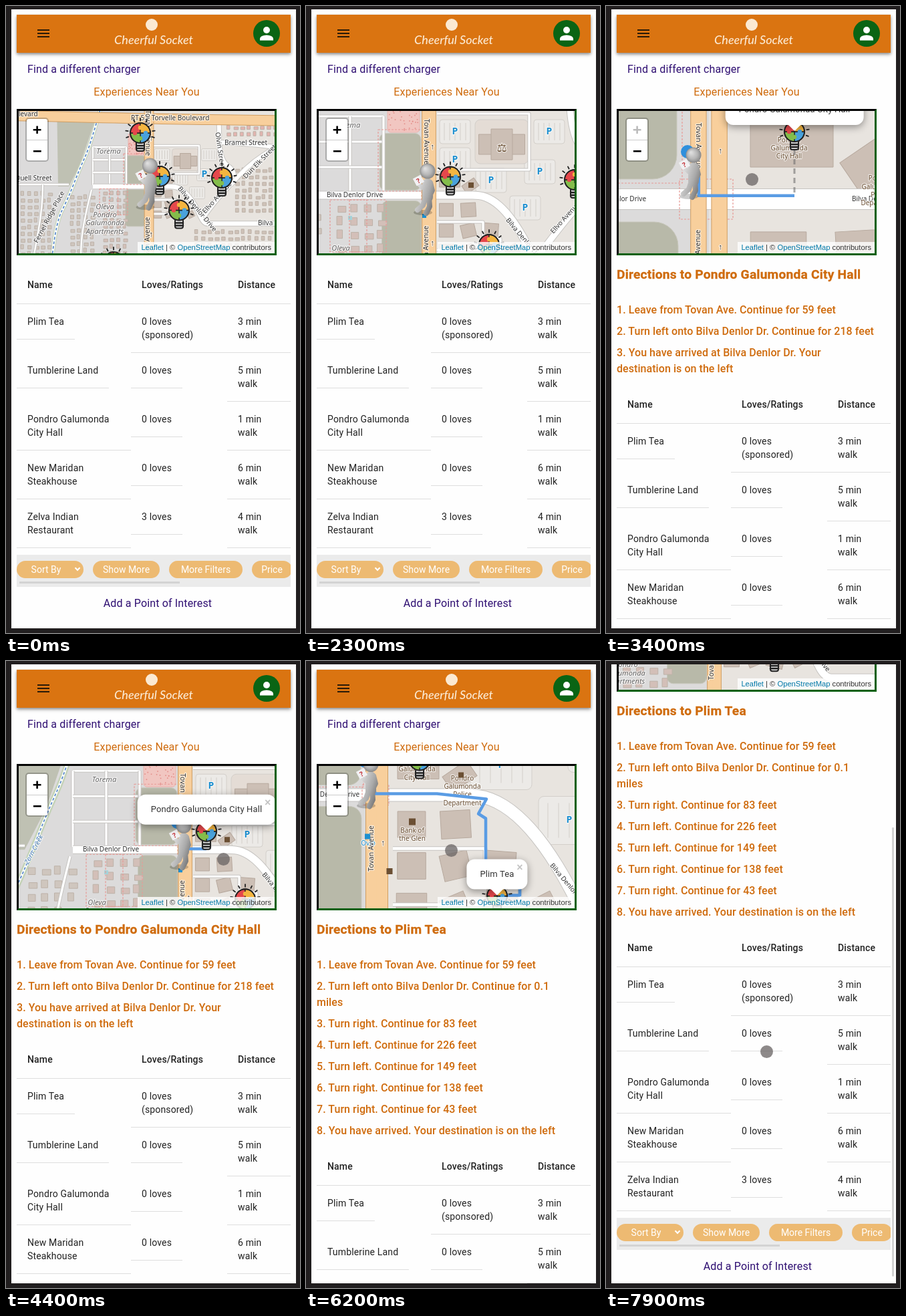
An HTML page with a canvas for the animation above (8 s loop, 440 by 938 pixels).

```html
<!DOCTYPE html>
<html lang="en">
<head>
<meta charset="utf-8">
<title>Nearby experiences</title>
<style>
html,body{margin:0;width:100%;height:100%;overflow:hidden;background:#211e1f}
#stage{position:absolute;left:0;top:0;width:440px;height:938px;overflow:hidden;font:16px/24px Roboto,sans-serif}
#page{position:absolute;left:8px;top:5px;width:426px;height:926px;overflow:hidden;background:#fefefe}
#scroll{position:absolute;left:-8px;top:-5px;width:440px;height:1280px}
#scroll div,#scroll span,#scroll canvas{position:absolute;box-sizing:border-box}
span{white-space:pre;letter-spacing:.15px}
.title{letter-spacing:.2px;-webkit-text-stroke:.3px}
.step{letter-spacing:.05px}
#bar{left:16px;top:13px;width:410px;height:57px;background:#da7411;box-shadow:0 2px 4px rgba(0,0,0,.35),0 3px 6px rgba(0,0,0,.16)}
#map{left:16px;top:154px;width:389px;height:219px;border:3px solid;border-color:#050505 #07600f #07600f #050505;overflow:hidden}
#zoom{left:10px;top:10px;width:35px;height:66px;border:2px solid rgba(0,0,0,.22);border-radius:5px;background:#fff;background-clip:padding-box;font:bold 22px/31px "DejaVu Sans Mono",monospace;text-align:center}
#zoom div{left:0;width:31px;height:31px}
#minus{top:31px;border-top:1px solid #ccc}
#credit{right:0;bottom:0;height:17px;padding:0 5px;background:rgba(255,255,255,.8);font:11.2px/17px "Liberation Sans",Arial,sans-serif;color:#333;white-space:pre}
#credit b{font-weight:400;color:#0078a8}
#pop{height:45px;padding:0 20px;border-radius:12px;background:#fff;box-shadow:0 3px 12px rgba(0,0,0,.4);font:13px/44px Roboto,sans-serif;color:#333;white-space:pre}
#pop i{position:absolute;left:50%;top:36px;width:15px;height:15px;margin-left:-7.5px;background:#fff;transform:rotate(45deg)}
#scroll #pop span{position:static}
#pop b{position:absolute;right:7px;top:2px;font:bold 16px/20px "Liberation Sans",sans-serif;color:#c3c3c3}
#strip{left:16px;top:821px;width:410px;height:48px;background:#ebebeb;overflow:hidden}
#strip div{top:9px;height:26px;border-radius:13px;background:#edba72;color:#fff;font-size:14px;line-height:26px;text-align:center}
#strip .sort{padding-right:12px}
#strip i{position:absolute;right:6px;top:8px;width:4px;height:4px;border:solid #fff;border-width:0 2px 2px 0;transform:rotate(45deg)}
#strip b{position:absolute;left:4px;top:40px;width:240px;height:3px;background:#d3d3d3}
#thumb,#dot{position:absolute}
#thumb{left:428px;top:0;width:3px;height:672px;border-radius:2px;background:#d2d2d2}
#dot{left:-9.5px;top:-9.5px;width:19px;height:19px;border-radius:50%;background:rgba(105,100,100,.76)}
</style>
</head>
<body>
<div id="stage">
 <div id="page"><div id="scroll">
  <div id="bar"></div>
  <canvas id="head" width="440" height="80"></canvas>
  <div id="map">
   <canvas id="view" width="383" height="213"></canvas>
   <div id="pop"><span></span><i></i><b>×</b></div>
   <div id="zoom"><div id="plus">+</div><div id="minus">−</div></div>
   <div id="credit"><b>Leaflet</b> | © <b>OpenStreetMap</b> contributors</div>
  </div>
  <div id="steps"></div>
  <div id="table"><div id="strip"><b></b></div></div>
 </div></div>
 <div id="thumb"></div><div id="dot"></div>
</div>
<script>
const $ = id => document.getElementById(id);
const ORANGE = '#cf6b0d', INDIGO = '#2f0f72', INK = '#222', BROWN = '#6b4f33', BLUE = '#1c8fd0', GREY = '#666';
const HALL = 'Pondro Galumonda City Hall', TEA = 'Plim Tea', DRIVE = 'Bilva Denlor Drive', AVENUE = 'Tovan Avenue';

// ---- page ----
function text(box, x, y, str, size, color, weight = 400, cls = '') {
  const e = document.createElement('span');
  e.textContent = str;
  e.className = cls;
  e.style.cssText = `left:${x}px;top:${y - 12}px;font-size:${size}px;color:${color};font-weight:${weight}`;
  box.append(e);
  return e;
}
const middle = e => { e.style.transform = 'translateX(-50%)'; };
const table = $('table');
function rule(x, y, w) {
  const e = document.createElement('div');
  e.style.cssText = `left:${x}px;top:${y}px;width:${w}px;height:1px;background:#dedede`;
  table.append(e);
}

text($('scroll'), 32, 95, 'Find a different charger', 16, INDIGO);
middle(text($('scroll'), 210.5, 129, 'Experiences Near You', 16, ORANGE));

const COLS = [16, 187, 331, 426];
['Name', 'Loves/Ratings', 'Distance'].forEach((s, i) => text(table, COLS[i] + 16, 417, s, 14, INK, 500));
rule(16, 445, 410);
[
  [TEA, '0 loves\n(sponsored)', '3 min\nwalk'],
  ['Tumblerine Land', '0 loves', '5 min\nwalk'],
  ['Pondro Galumonda\nCity Hall', '0 loves', '1 min\nwalk'],
  ['New Maridan\nSteakhouse', '0 loves', '6 min\nwalk'],
  ['Zelva Indian\nRestaurant', '3 loves', '4 min\nwalk']
].forEach((row, r) => row.forEach((cell, c) => {
  const top = 446 + r * 73, lines = cell.split('\n'), x = COLS[c];
  const spans = lines.map((s, k) => text(table, x + 16, top + 26 + k * 20, s, 14, INK));
  rule(x, top + 32 + 20 * lines.length, lines[1] ? COLS[c + 1] - x : spans[0].offsetWidth + 32);
}));

let left = 0;
[['Sort By', 100], ['Show More', 100], ['More Filters', 110], ['Price', 60]].forEach(([s, w], i) => {
  const b = document.createElement('div');
  b.style.left = left + 'px'; b.style.width = w + 'px';
  b.textContent = s;
  if (!i) { b.className = 'sort'; b.append(document.createElement('i')); }
  $('strip').append(b);
  left += w + 14;
});
middle(text(table, 227, 894, 'Add a Point of Interest', 16, INDIGO));

const PLANS = [null, {
  title: HALL,
  lines: ['1. Leave from Tovan Ave. Continue for 59 feet', '2. Turn left onto Bilva Denlor Dr. Continue for 218 feet',
    '3. You have arrived at Bilva Denlor Dr. Your\ndestination is on the left']
}, {
  title: TEA,
  lines: ['1. Leave from Tovan Ave. Continue for 59 feet', '2. Turn left onto Bilva Denlor Dr. Continue for 0.1\nmiles',
    '3. Turn right. Continue for 83 feet', '4. Turn left. Continue for 226 feet', '5. Turn left. Continue for 149 feet',
    '6. Turn right. Continue for 138 feet', '7. Turn right. Continue for 43 feet', '8. You have arrived. Your destination is on the left']
}];
let shown = 0;
function showPlan(n) {
  if (n === shown) return;
  shown = n;
  const box = $('steps'), plan = PLANS[n];
  box.textContent = '';
  table.style.top = 0;
  if (!plan) return;
  text(box, 16, 402, 'Directions to ' + plan.title, 19.2, ORANGE, 700, 'title');
  let y = 455;
  for (const s of plan.lines) {
    text(box, 16, y, s, 16, ORANGE, 500, 'step');
    y += 8 + 24 * s.split('\n').length;
  }
  table.style.top = y - 396 + 'px';
}

// ---- header ----
const h = $('head').getContext('2d');
function disc(c, x, y, r, fill) { c.fillStyle = fill; c.beginPath(); c.arc(x, y, r, 0, 7); c.fill(); }
h.fillStyle = '#2a1a08';
for (let y = 35; y < 50; y += 5) h.fillRect(47, y, 18, 2);
disc(h, 218, 28, 9, '#fbe9d2');
h.font = 'italic 500 18px Lato,sans-serif';
h.textAlign = 'center';
h.fillText('Cheerful Socket', 221, 57);
disc(h, 390, 41, 20, '#0a6414');
disc(h, 390, 36, 5, '#fff');
h.beginPath(); h.ellipse(390, 49, 10, 5.5, 0, Math.PI, 0); h.rect(380, 48.5, 20, 3); h.fill();

// ---- map: world units are pixels at scale 1, origin at the main crossing ----
const g = $('view').getContext('2d');
let S, CX, CY;
const X = x => CX + x * S, Y = y => CY + y * S;
function path(p) {
  g.beginPath();
  for (let i = 0; i < p.length; i += 2) g.lineTo(X(p[i]), Y(p[i + 1]));
}
function curve(p) {
  const n = p.length;
  g.beginPath(); g.moveTo(X(p[0]), Y(p[1]));
  for (let i = 2; i < n - 2; i += 2)
    g.quadraticCurveTo(X(p[i]), Y(p[i + 1]), X((p[i] + p[i + 2]) / 2), Y((p[i + 1] + p[i + 3]) / 2));
  g.lineTo(X(p[n - 2]), Y(p[n - 1]));
}
function line(color, w, dash = []) {
  g.strokeStyle = color; g.lineWidth = w; g.setLineDash(dash); g.stroke(); g.setLineDash([]);
}
function road(p, w, fill = '#fff', edge = '#c6c4c1') { curve(p); line(edge, w + 2); line(fill, w); }
// box around a centre
function box(x, y, w, hh, fill, edge, r = 0, turn = 0) {
  g.save(); g.translate(X(x), Y(y)); g.rotate(turn);
  g.beginPath(); g.roundRect(-w * S / 2, -hh * S / 2, w * S, hh * S, r * S);
  g.fillStyle = fill; g.fill();
  if (edge) line(edge, 1);
  g.restore();
}
const noise = n => { const v = Math.sin(n * 127.1) * 43758.5; return v - Math.floor(v); };
const square = (x, y, r, c) => { g.fillStyle = c; g.fillRect(X(x) - r, Y(y) - r, 2 * r, 2 * r); };
const building = (x, y, w, hh, turn) => box(x, y, w, hh, '#ccbfb5', '#b7a99e', 0, turn);
function houses(x0, y0, x1, y1, fill) {
  for (let x = x0; x < x1; x += 20) for (let y = y0; y < y1; y += 20) {
    const n = noise(x * 1.7 + y * .31);
    box(x + n * 5, y + n * 4, 8 + n * 5, 13 - n * 5, fill, '#bdb2a8');
  }
}

// the drive runs straight, then bends along a parabola until it levels out
const driveY = x => x < 70 ? 0 : Math.min(111, (x - 70) ** 2 / 80);
const MAIN = [];
for (let x = 0; x <= 390; x += 10) MAIN.push(x, driveY(x));
const CREEK = [-146, -230, -176, -122, -208, -52, -243, 38, -278, 106, -300, 300];
const LOTS = [[39, -95], [39, -53], [93, -22], [180, -95], [166, -35], [144, 19]];

function ground() {
  const field = '#b8b9a9', lot = '#eceae7', rim = '#d3cfca';
  g.fillStyle = '#dcdbdb'; g.fillRect(0, 0, 383, 213);
  box(450, 0, 900, 900, '#e8e4df');
  path([-275, -196, -162, -196, -208, -62, -240, 0, -272, 0]);
  g.fillStyle = '#bfc1b3'; g.fill();
  box(-43, -50, 62, 85, field, '#c9c8bd', 9);
  box(-41, 64, 59, 111, field, '#c9c8bd', 9);
  box(-38, -126, 48, 64, '#f1c6c1', '#e9b3ae', 5);
  for (let k = 0; k < 70; k++) square(-60 + noise(k) * 44, -155 + noise(k + 90) * 58, .8, '#e38d88');
  curve(CREEK); line('#c5d3b8', 9 * Math.sqrt(S)); line('#fff', 4); line('#4c80c4', 1.6, [4, 3]);

  houses(-380, 20, -295, 210, '#cfc6be');
  houses(-232, 30, -165, 210, '#cfc6be');
  houses(-134, 18, -66, 210, '#d3bfb8');
  houses(236, -178, 380, -138, '#e4b4af');
  houses(262, -50, 380, 80, '#cfc2b8');
  houses(140, 134, 380, 210, '#cfc2b8');
  square(-118, 34, 3 * S, '#a4d3da');

  for (const [x, y] of LOTS) {
    box(x, y, 46, 36, lot, rim, 4);
    for (let k = -16; k < 20; k += 8) { path([x + k, y - 13, x + k, y + 13]); line(rim, 1); }
  }
  box(109, -80, 80, 66, '#e4dcd5', rim, 8);
  building(109, -76, 69, 30); building(109, -76, 32, 46);
  building(31, -22, 31, 20); building(62, -14, 22, 14, -.6);
  // offices south of the drive
  for (let x = 26; x < 240; x += 33) for (let y = 22; y < 110; y += 31) {
    const n = noise(x + y * 2.3);
    if (y > driveY(x + 14) + 18) building(x, y, 18 + n * 8, 17 + n * 7, x < 30 ? 0 : n - .6);
  }

  const thin = 3.2 * Math.sqrt(S);
  for (let i = 0; i < 3; i++) {
    const x = -168 + i * 50, y = -118 + i * 38;
    road([-168, y, -68, y], thin); road([x, -118, x, -4], thin);
  }
  road([-390, -6, -240, -6], thin); road([-318, -6, -318, 60, -345, 210], thin);
  road([-172, 10, -200, 120, -205, 220], thin);
  path([12, 40, 81, 40, 81, 60, 107, 65, 107, 82, 12, 82]); line('#c6c4c1', thin + 2); line('#fff', thin);
  path([12, -38, 150, -38, 150, -122, 12, -122]); line('#c6c4c1', thin + 2); line('#fff', thin);
  const mid = 9 * Math.pow(S, .6), wide = 11 * Math.pow(S, .72);
  road([160, 96, 204, 36, 248, -8, 258, -46, 212, -80, 209, -205], mid);
  road([245, -5, 290, -60, 390, -125], mid); road([210, -132, 300, -128, 390, -116], mid);
  road([-168, 0, 0, 0], wide); road(MAIN, wide);

  // footways
  for (const [x, y, w, hh] of [[-106, 46, 84, 78], [-106, 46, 26, 78], [-43, -52, 66, 92], [-1, 0, 20, 15]]) {
    g.beginPath(); g.rect(X(x - w / 2), Y(y - hh / 2), w * S, hh * S); line('#e79a96', 1.2, [3, 2]);
  }

  const lane = 12 * Math.pow(S, .45), peach = '#f8cf9c', edge = '#cf9d62';
  road([-400, -212, -30, -203, 400, -197], 13 * Math.sqrt(S) + 5, peach, edge);
  for (const [c, w] of [[edge, lane + 2], [peach, lane]])
    for (const x of [-3.9, 3.9]) { path([x, -400, x, 400]); line(c, w); }
}

function label(str, x, y, deg = 0, color = '#333', size = 10, style = '') {
  const rows = str.split('\n');
  g.save(); g.translate(X(x), Y(y)); g.rotate(deg * Math.PI / 180);
  g.font = `${style} ${size}px "Noto Sans","Open Sans",sans-serif`;
  g.textAlign = 'center'; g.textBaseline = 'middle'; g.lineJoin = 'round';
  rows.forEach((s, i) => {
    const dy = (i - (rows.length - 1) / 2) * 12.3;
    g.strokeStyle = 'rgba(255,255,255,.65)'; g.lineWidth = 2.5; g.strokeText(s, 0, dy);
    g.fillStyle = color; g.fillText(s, 0, dy);
  });
  g.restore();
}

// lowest and highest zoom, then the label
const LABELS = [
  [-1, 0, 'Torema', -121, -104, 0, GREY, 11, 'italic'],
  [-1, 0, 'Oleva\nPondro\nGalumonda\nApartments', -132, 98, 0, GREY, 11, 'italic'],
  [-1, -1, 'Torvelle Boulevard', 94, -203], [-1, -1, 'RT 52', -28, -203], [-1, -1, 'Boulevard', -380, -216],
  [-1, -1, 'Quell Street', -346, -24], [-1, -1, 'Fernel Ridge Place', -298, 92, -62],
  [-1, -1, 'Olvin Street', 212, -108, 82], [-1, -1, 'Bramel Street', 290, -130], [-1, -1, 'Dun Elk Street', 332, -74, -46],
  [-1, 0, 'Ellvo Avenue', 204, 34, -48], [0, 0, 'Zorn Creek', -226, 0, -62, '#4f7fb5', 10, 'italic'],
  [-1, -1, DRIVE, 410, 111], [-1, 1, DRIVE, 144, 68, 50], [0, 0, DRIVE, -111, 0], [1, 2, DRIVE, -34, 0], [2, 2, DRIVE, 64, 0],
  [0, 0, '⚖', 109, -70, 0, BROWN, 17],
  [1, 2, 'Pondro\nGalumonda\nCity Hall', 30, -19, 0, BROWN], [1, 2, 'Pondro\nGalumonda\nPolice\nDepartment', 64, -3, 0, BROWN],
  [1, 1, 'Bank of\nthe Glen', 26.5, 30, 0, BROWN], [1, 1, 'Ovlo', -6.5, 36.5, 0, BLUE]
];
function names() {
  const z = Math.round(Math.log2(S));
  for (const [lo, hi, ...l] of LABELS) if (z >= lo && z <= hi) label(...l);
  for (let k = -2; k < 2; k++) {
    const side = k < 0 ? 1 : -1, y = (k + .5) * 160 / S;
    label(AVENUE, -4, y, 90 * side, '#333', 10.5);
    label('→', 4, y * .9, -90, '#333', 12);
  }
  for (const [x, y] of z < 0 ? [LOTS[4]] : LOTS) label('P', x, y, 0, BLUE, 14, 'bold');
  if (z === 0 || z === 1) {
    square(-7, 31, 3 + z, BLUE);
    square(63, -15, 4, BROWN);
  }
  if (z === 1) { square(26.5, 20, 5, BROWN); square(9.5, 57, 4.5, BROWN); }
}

function bulb(wx, wy) {
  g.save(); g.translate(X(wx), Y(wy) + 1);
  g.lineCap = 'round';
  for (let k = 0; k < 9; k++) {
    const a = Math.PI * (.9 + k * .15), c = Math.cos(a), s = Math.sin(a);
    g.beginPath(); g.moveTo(c * 18.5, s * 18.5 - 4); g.lineTo(c * 22, s * 22 - 4); line('#222', 1.8);
  }
  g.fillStyle = '#ddd'; g.beginPath(); g.roundRect(-6, 9, 12, 14, 3); g.fill(); line('#222', 2);
  for (const y of [15, 19]) { g.beginPath(); g.moveTo(-6, y); g.lineTo(6, y); line('#222', 2.4); }
  const tint = ['#4aa2dc', '#84bd4b', '#e5484c', '#f4b540'], q = Math.PI / 2;
  tint.forEach((c, i) => {
    g.beginPath(); g.moveTo(0, -4); g.arc(0, -4, 15, i * q, (i + 1) * q);
    g.closePath(); g.fillStyle = c; g.fill(); line('#222', 1.3);
  });
  tint.forEach((c, i) => disc(g, 8 * Math.cos(i * q), 8 * Math.sin(i * q) - 4, 3.2, c));
  g.beginPath(); g.arc(0, -4, 15, 0, 7); line('#222', 2);
  g.restore();
}

function walker() {
  g.save(); g.translate(X(-7) + 1, Y(-10) + 1);
  const skin = g.createLinearGradient(-10, 0, 16, 8);
  skin.addColorStop(0, '#d6d6d6'); skin.addColorStop(.6, '#aaa'); skin.addColorStop(1, '#7c7c7c');
  const limb = (w, ...p) => {
    g.beginPath(); p.forEach(([x, y]) => g.lineTo(x, y));
    g.lineCap = g.lineJoin = 'round'; line(skin, w);
  };
  g.fillStyle = 'rgba(0,0,0,.2)'; g.beginPath(); g.ellipse(-3, 35, 14, 4, 0, 0, 7); g.fill();
  limb(8, [6, 12], [7, 26], [2, 36]);
  limb(8, [1, 12], [-3, 24], [-11, 31]);
  limb(16, [4, -8], [4, 12]);
  limb(6, [2, -12], [-4, -2], [-10, -8]);
  g.save(); g.translate(-10, -13); g.rotate(-.5);
  g.fillStyle = '#f1f1f3'; g.fillRect(-6, -6, 13, 12);
  g.fillStyle = '#c32f36'; g.font = 'bold 10px "Open Sans",sans-serif'; g.textAlign = 'center'; g.fillText('?', 0, 4);
  g.restore();
  limb(6, [9, -10], [12, 2], [8, 10]);
  const ball = g.createRadialGradient(0, -31, 1, 4, -27, 12);
  ball.addColorStop(0, '#dedede'); ball.addColorStop(.6, '#b5b5b5'); ball.addColorStop(1, '#858585');
  disc(g, 4, -27, 11.5, ball);
  g.restore();
}

const ROUTES = [null, [-3.8, -9.5, -3.8, -1.3, 32, -1.3],
  [-4, -9, -1, -1, 45, -1, 82, 3, 76, 14, 81.5, 17.5, 81.5, 60, 107, 65, 107, 75, 92, 75]];
const PINS = [[-26, -154], [218, -20], [32, -24.5], [90, 77], [-106, 232]];

function drawMap(v, plan) {
  S = v[0]; CX = v[1] - 19; CY = v[2] - 157;
  g.lineCap = 'butt'; g.lineJoin = 'round';
  ground(); names();
  if (plan) {
    if (plan === 1) { path([32, -22, 32, -1.3]); line('rgba(110,110,110,.6)', 3, [8, 6]); }
    path(ROUTES[plan]); line('#5a9ce4', 4.5);
    disc(g, X(-7) - 4, Y(-10) - 31, 10, '#2f8fdc');
  }
  PINS.forEach(p => bulb(...p));
  walker();
}

// ---- timeline ----
const TAPS = { hall: 2800, tea: 5700 }, DRAG = [4600, 5200];
// start, factor, fixed point
const ZOOMS = [
  [1100, 2, 244, 257], [2950, 4, 194, 281], [3650, .5, 306, 280], [4000, .5, 306, 280], [5900, 2, 148, 212], [6400, .5, 218, 282]
];
// start, end, place reached
const GLIDES = [
  [2500, 2650, 218, 259], [3500, 3650, 306, 280], [4250, 4400, 325, 296], [...DRAG, 184, 220],
  [5200, 5500, 217, 283], [6600, 6800, 267, 560], [7200, 7900, 240, 584]
];
const clamp = u => Math.max(0, Math.min(1, u));
const part = (t, a, b) => clamp((t - a) / (b - a));
const smooth = u => u * u * (3 - 2 * u), out = (u, n) => 1 - (1 - u) ** n;

function dotAt(t) {
  let x = 230, y = 300;
  for (const [a, b, tx, ty] of GLIDES) {
    const u = smooth(part(t, a, b));
    x += (tx - x) * u; y += (ty - y) * u;
  }
  return [x, y];
}
function viewAt(t) {
  let s = .5, x = 214, y = 270;
  const from = dotAt(DRAG[0]), to = dotAt(Math.max(DRAG[0], Math.min(DRAG[1], t)));
  for (const [a, k, px, py] of ZOOMS) {
    if (a > DRAG[1] && t < a) break;
    const f = 1 + (k - 1) * out(part(t, a, a + 250), 3);
    const dx = a > DRAG[1] ? to[0] - from[0] : 0, dy = a > DRAG[1] ? to[1] - from[1] : 0;
    s *= f;
    x = px + (x + dx - px) * f - dx; y = py + (y + dy - py) * f - dy;
  }
  return [s, x + to[0] - from[0], y + to[1] - from[1]];
}
const scrollAt = t => 177 * part(t, 6800, 7200) + 150 * out(part(t, 7200, 7900), 2);

function frame() {
  const t = performance.now() % 8000;
  const plan = t < TAPS.hall + 150 ? 0 : t < TAPS.tea + 200 ? 1 : 2;
  const v = viewAt(t), y = scrollAt(t), tea = t >= TAPS.tea;
  showPlan(plan);
  drawMap(v, plan);

  const pop = $('pop'), [px, py] = PINS[tea ? 3 : 2];
  pop.style.visibility = t >= TAPS.hall ? 'visible' : 'hidden';
  pop.firstChild.textContent = tea ? TEA : HALL;
  pop.style.transform = `translate(${X(px)}px,${Y(py) - 58}px) translateX(-50%)`;
  $('plus').style.color = v[0] > 3.9 ? '#bbb' : '#000';

  $('scroll').style.transform = `translateY(${-y}px)`;
  $('thumb').style.opacity = t > 6750 ? 1 : 0;
  $('thumb').style.transform = `translateY(${6 + y * .742}px)`;
  const [dx, dy] = dotAt(t);
  $('dot').style.opacity = part(t, 2500, 2650);
  $('dot').style.transform = `translate(${dx}px,${dy}px)`;
  requestAnimationFrame(frame);
}
frame();
</script>
</body>
</html>
```
